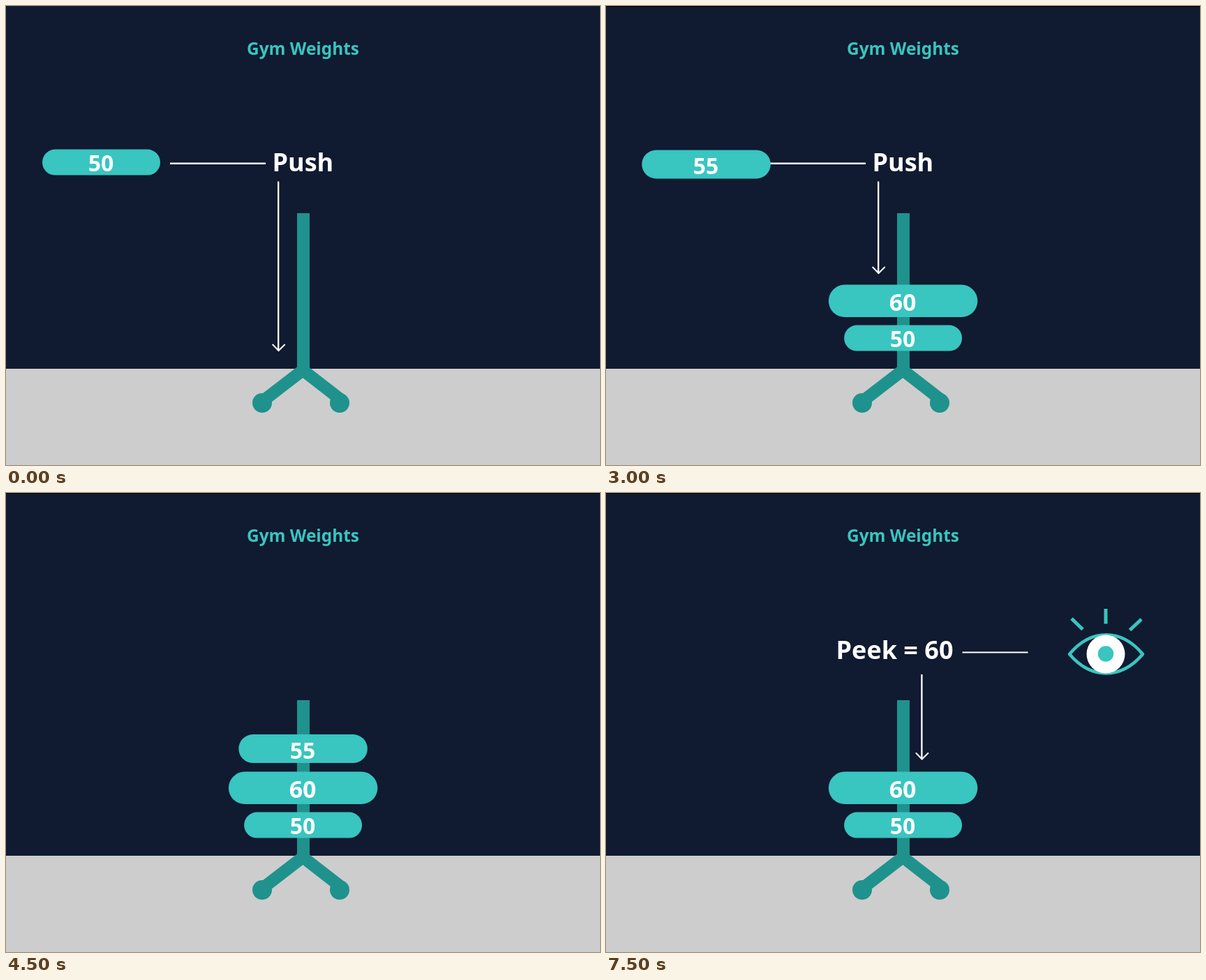
An HTML page with a canvas for the animation above (9 s loop, 851 by 658 pixels).

```html
<!DOCTYPE html>
<html lang="en">
<head>
<meta charset="utf-8">
<title>Gym Weights</title>
<style>
  html, body { margin: 0; width: 100%; height: 100%; overflow: hidden; background: #101a30; }
  canvas { display: block; width: 851px; height: 658px; }
</style>
</head>
<body>
<canvas id="stage"></canvas>
<script>
const W = 851, H = 658, STEP = 1500;
const NAVY = '#101a30', GROUND = '#cdcdcd', TEAL = '#39c5c0', POLE = '#1f928d', WHITE = '#fff';

const canvas = document.getElementById('stage');
const ctx = canvas.getContext('2d');
const ratio = window.devicePixelRatio || 1;
canvas.width = W * ratio;
canvas.height = H * ratio;
ctx.scale(ratio, ratio);

// Pill size, and the text's size and baseline relative to the pill's top
const weights = {
  50: { w: 169, h: 37, size: 32, base: 31 },
  60: { w: 213.5, h: 46.5, size: 34, base: 37.3 },
  55: { w: 184.5, h: 41, size: 32, base: 34.8 }
};

function text(str, x, y, size, color = WHITE) {
  ctx.font = `600 ${size}px "Noto Sans", "Open Sans", sans-serif`;
  ctx.textAlign = 'center';
  ctx.textBaseline = 'alphabetic';
  ctx.fillStyle = color;
  ctx.fillText(str, x, y);
}

function line(points, width = 2.3, color = WHITE, cap = 'butt') {
  ctx.beginPath();
  points.forEach(([x, y]) => ctx.lineTo(x, y));
  ctx.lineWidth = width;
  ctx.strokeStyle = color;
  ctx.lineCap = cap;
  ctx.lineJoin = 'miter';
  ctx.stroke();
}

function disc(x, y, r, color) {
  ctx.beginPath();
  ctx.arc(x, y, r, 0, Math.PI * 2);
  ctx.fillStyle = color;
  ctx.fill();
}

function arrowDown(x, top, tip) {
  line([[x, top], [x, tip]]);
  line([[x - 8, tip - 9], [x + 0.3, tip - 0.5], [x + 9, tip - 9]], 2, WHITE, 'round');
}

function weight(n, cx, top) {
  const { w, h, size, base } = weights[n];
  ctx.beginPath();
  ctx.roundRect(cx - w / 2, top, w, h, h / 2);
  ctx.fillStyle = TEAL;
  ctx.fill();
  text(String(n), cx - 0.5, top + base, size);
}

function stand() {
  ctx.fillStyle = POLE;
  ctx.fillRect(417, 297, 18, 227);
  line([[367, 567], [425.3, 522], [478, 563]], 17.5, POLE);
  disc(367, 569, 14, POLE);
  disc(478, 569, 14, POLE);
}

function eye() {
  ctx.beginPath();
  ctx.moveTo(664, 231);
  ctx.bezierCurveTo(695, 194, 738, 194, 769, 231);
  ctx.bezierCurveTo(738, 267.5, 695, 267.5, 664, 231);
  ctx.closePath();
  ctx.lineWidth = 4.5;
  ctx.lineJoin = 'round';
  ctx.strokeStyle = TEAL;
  ctx.stroke();
  disc(716, 231, 27.5, WHITE);
  disc(716, 230.5, 11.2, TEAL);
  line([[667, 180], [683, 195.5]], 5, TEAL);
  line([[716, 166], [716, 187.5]], 5, TEAL);
  line([[767, 181], [750.5, 196.5]], 5, TEAL);
}

function push(n, cx, top, tip) {
  line([[235, 225.8], [372, 225.8]], 2.5);
  weight(n, cx, top);
  text('Push', 425.3, 236.8, 36);
  arrowDown(390.2, 251.5, tip);
}

function pop() {
  text('Pop', 425.2, 236.8, 36);
  line([[469, 228.8], [595.5, 228.8]]);
  line([[586, 219.5], [595.5, 228.8], [586, 237]], 2, WHITE, 'round');
  line([[452, 252], [452, 381]]);
  weight(55, 707.3, 200);
}

function peek() {
  text('Peek = 60', 413.5, 238.4, 36);
  line([[510.5, 228.5], [604.5, 228.5]], 2);
  arrowDown(452.4, 260, 382);
  eye();
}

const stackTops = [[50, 457.6], [60, 399.6], [55, 346.1]];
const scenes = [
  { stacked: 0, action: () => push(50, 136.5, 205.6, 494.5) },
  { stacked: 1, action: () => push(60, 136.2, 201.4, 383.5) },
  { stacked: 2, action: () => push(55, 143.6, 206.4, 383.5) },
  { stacked: 3, action: () => {} },
  { stacked: 2, action: pop },
  { stacked: 2, action: peek }
];

function draw(index) {
  const { stacked, action } = scenes[index];
  ctx.fillStyle = NAVY;
  ctx.fillRect(0, 0, W, H);
  ctx.fillStyle = GROUND;
  ctx.fillRect(0, 520, W, H - 520);
  if (index > 0) {
    ctx.fillStyle = '#000';
    ctx.fillRect(0, 0, W, 1);
  }
  text('Gym Weights', 425.5, 69.6, 24.4, TEAL);
  stand();
  stackTops.slice(0, stacked).forEach(([n, top]) => weight(n, 425.6, top));
  action();
}

const start = performance.now();
function frame() {
  const time = performance.now() - start;
  draw(Math.floor(time / STEP) % scenes.length);
  requestAnimationFrame(frame);
}
frame();
</script>
</body>
</html>
```
